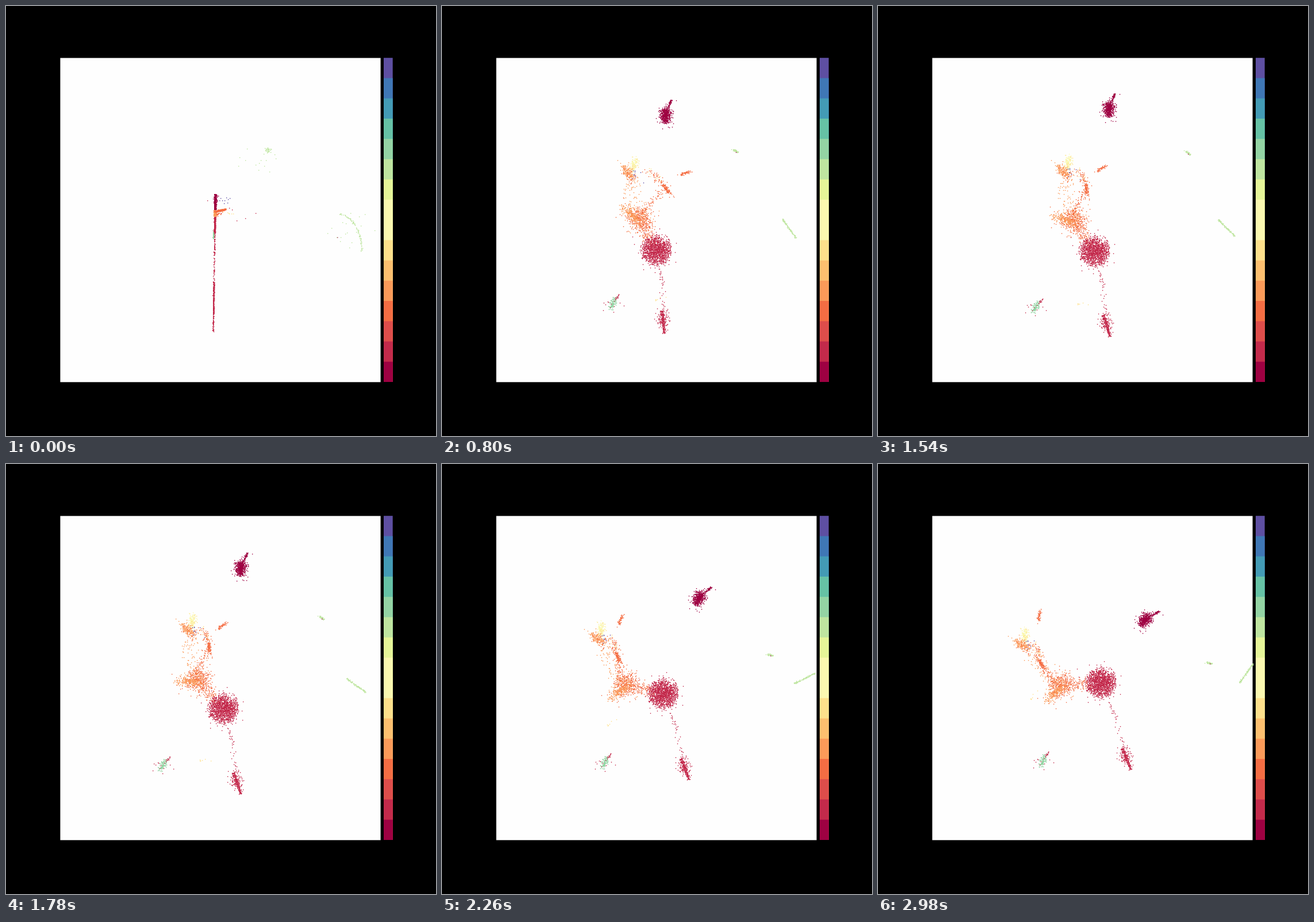
Write an HTML page with a canvas that moves like this. It is 748 px wide and 748 px high and loops after 3030 ms.

```html
<!DOCTYPE html>
<html lang="en">
<head>
<meta charset="utf-8">
<title>Point clusters</title>
<style>
  html, body { margin: 0; width: 100%; height: 100%; overflow: hidden; background: #000; }
  canvas { display: block; }
</style>
</head>
<body>
<canvas id="stage" width="748" height="748"></canvas>
<script>
const ctx = document.getElementById('stage').getContext('2d');
const LOOP = 3030, STEP = 20, LAST = 2980;
const OPEN = 360;        // ms until the clusters have burst apart
const TURN = 2111;       // middle of the late swing
const BAR = ['#5e4fa2', '#3f77b5', '#439bb5', '#66c2a5', '#94d4a4', '#bfe5a0', '#e6f598', '#fbf8b0',
  '#fbf8b0', '#fee08b', '#fdbf6f', '#fb9a59', '#f46d43', '#de4d4b', '#c32a4b', '#9e0142'];
const [PURPLE, , , , GREEN, LIME, , PALE, , YELLOW, , LIGHT, ORANGE, , RED, DARK] = BAR;

let seed = 20247;
function rnd() {
  seed = (seed + 0x6d2b79f5) | 0;
  let r = Math.imul(seed ^ (seed >>> 15), 1 | seed);
  r = (r + Math.imul(r ^ (r >>> 7), 61 | r)) ^ r;
  return ((r ^ (r >>> 14)) >>> 0) / 4294967296;
}
const mix = (a, b, s) => a + (b - a) * s;
const between = (a, b) => mix(a, b, rnd());
const normal = () => Math.sqrt(-2 * Math.log(1 - rnd())) * Math.cos(2 * Math.PI * rnd());
function turn([x, y], deg) {
  const a = deg * Math.PI / 180, c = Math.cos(a), s = Math.sin(a);
  return [x * c - y * s, x * s + y * c];
}

// Shapes return one random offset inside a cluster
const gauss = (sx, sy) => () => [normal() * sx, normal() * sy];
const streak = (y0, y1, w, bend = 0) => () => {
  const y = between(y0, y1);
  return [bend * y + normal() * w, y];
};
const disc = (r, soft) => () => turn([r * Math.pow(rnd(), 0.58) + normal() * soft, 0], rnd() * 360);
const shift = (shape, ox, oy, deg = 0) => () => {
  const [x, y] = turn(shape(), deg);
  return [x + ox, y + oy];
};

// Starts return one random point of the opening picture
const stem = (y0, y1, noise = 0.5) => () => {
  const y = between(y0, y1);
  return [364.2 - (y - 328) * 0.015 + normal() * noise, y];
};
const dab = (x, y, sx, sy) => shift(gauss(sx, sy), x, y);
const branch = () => {
  const s = rnd();
  return [363 + 19 * s + normal() * 0.6, 358 - 4 * s + normal() * 0.6];
};
const sickle = () => {
  const a = Math.pow(rnd(), 0.8) * Math.PI / 2;
  return [578 + 41 * Math.sin(a) + normal() * 0.7, 426 - 64 * Math.cos(a) + normal() * 0.7];
};

// Paths: x, y, angle when burst apart, when settled and after the swing
const path = (burst, calm, end, lead = 0) => ({ burst, calm, end, lead });
const top1 = path([372, 226, 4], [405, 177, 2], [466, 271, 42]);
const ball = path([367, 418, 0], [378, 427, 0], [388, 380, 0]);
const foot = path([367, 522, 12], [400, 552, -22], [431, 508, -22]);
const leaf = path([333, 498, 8], [264, 525, 30], [286, 517, 18]);
const hip = path([345, 363, 50], [342, 371, 0], [316, 385, -60], 250);
const crest = path([335, 288, 25], [332, 273, 4], [255, 299, -5]);
const knot = path([428, 318, -82], [354, 317, 5], [282, 347, -32]);
const twig = path([472, 317, 90], [378, 282, 58], [279, 264, 10]);
const chip = path([472, 247, 90], [548, 255, 138], [578, 347, 100], 200);
const arc = path([602, 391, -25], [606, 386, -45], [641, 364, -145]);
const crumb = path([410, 482, 45], [345, 520, 110], [268, 405, 45]);

// Sideways moves lead, vertical ones settle faster but swing later
function pose({ burst, calm, end, lead }, t) {
  const since = Math.max(0, t - OPEN);
  const swing = 1 / (1 + Math.exp((TURN - lead - t) / 158));
  return burst.map((b, i) => {
    const vertical = i === 1;
    const settle = 1 - Math.exp(-since / (vertical ? 320 : 600));
    return mix(b, calm[i], settle) + (end[i] - calm[i]) * Math.pow(swing, vertical ? 1.6 : 1);
  });
}

const groups = [];
function cloud(color, n, start, shape, path) {
  const dots = Array.from({ length: n }, () => ({ start: start(), local: shape() }));
  groups.push({ color, dots, path });
}
function bridge(color, n, start, from, to, s0, s1, noise, bow = 0) {
  const shape = gauss(noise, noise);
  const dots = Array.from({ length: n }, () => ({ start: start(), local: shape(), s: between(s0, s1) }));
  groups.push({ color, dots, from, to, bow });
}

const joint = stem(356, 366, 0.7);
cloud(PALE, 140, joint, gauss(2.8, 5.5), crest);
cloud(YELLOW, 14, joint, gauss(4, 6), crest);
cloud(ORANGE, 300, joint, gauss(11, 9), hip);
cloud(LIGHT, 130, joint, gauss(9, 12), hip);
cloud(ORANGE, 40, dab(368, 362, 3, 2), gauss(20, 18), hip);
bridge(ORANGE, 130, joint, hip, ball, 0.15, 0.75, 6);

cloud(RED, 1250, stem(345, 395), disc(23.5, 3.2), ball);
cloud(RED, 150, stem(345, 567), gauss(15, 16), ball);
bridge(RED, 36, stem(400, 567), ball, foot, 0.25, 0.9, 2, 5);
cloud(RED, 170, stem(480, 537), streak(-14, 25, 1.2), foot);
cloud(RED, 110, stem(480, 567), gauss(5.5, 7), foot);

cloud(GREEN, 110, dab(360.9, 399, 0.3, 3), gauss(2.4, 6), leaf);
cloud(RED, 14, stem(398, 440), streak(-19, -7, 0.8, -0.25), leaf);
cloud(RED, 12, stem(410, 460), gauss(10, 10), leaf);

cloud(DARK, 310, stem(328, 355, 0.8), gauss(4.8, 5.5), top1);
cloud(DARK, 190, stem(328, 355, 0.8), streak(-9, 15, 2.8), top1);
cloud(DARK, 60, stem(328, 355, 0.8), streak(-27, -8, 1, -0.3), top1);
cloud(DARK, 65, dab(365, 338, 1.2, 5), gauss(7, 11), top1);

cloud(LIGHT, 170, branch, shift(gauss(9, 3.6), -17, 0, 25), hip);
cloud(LIGHT, 170, joint, shift(gauss(8, 4.2), -7, 15, 40), crest);
cloud(ORANGE, 30, branch, shift(gauss(9, 5), -2, 20, 40), crest);
cloud(PURPLE, 9, dab(380, 340, 7, 4), shift(gauss(8, 4), 11, 20, 40), crest);
bridge(ORANGE, 50, branch, crest, knot, 0.35, 0.95, 3.5, 6);
bridge(YELLOW, 12, joint, crest, knot, 0.3, 0.8, 5, 6);
bridge(ORANGE, 60, branch, knot, hip, 0.1, 0.85, 3.5, -3);
bridge(LIGHT, 50, joint, crest, hip, 0.2, 0.8, 8, -8);
cloud(ORANGE, 110, branch, gauss(1.9, 7), knot);
cloud(ORANGE, 55, branch, gauss(1.2, 7.5), twig);

cloud(LIME, 32, dab(455, 251, 3, 2), streak(-5, 5, 0.8), chip);
cloud(LIME, 14, dab(455, 262, 18, 14), gauss(1, 4), chip);
cloud(DARK, 1, dab(577, 403, 0, 0), gauss(1, 1), chip);
cloud(LIME, 75, sickle, streak(-20, 20, 0.6), arc);
cloud(LIME, 20, dab(590, 390, 20, 18), streak(-20, 20, 0.6), arc);
cloud(YELLOW, 6, dab(390, 360, 9, 2), gauss(1, 4), crumb);
cloud(RED, 7, dab(400, 362, 22, 14), gauss(18, 18), ball);

function placer(g, t) {
  if (g.path) {
    const [x, y, deg] = pose(g.path, t);
    return ({ local }) => {
      const [dx, dy] = turn(local, deg);
      return [x + dx, y + dy];
    };
  }
  const [ax, ay] = pose(g.from, t), [bx, by] = pose(g.to, t);
  const dx = bx - ax, dy = by - ay, len = Math.hypot(dx, dy);
  const spread = 1 + 1.1 * Math.exp(-Math.max(0, t - OPEN) / 150);
  return ({ local, s }) => {
    const b = g.bow * 4 * s * (1 - s) / len;
    return [ax + dx * s + dy * b + local[0] * spread, ay + dy * s - dx * b + local[1] * spread];
  };
}

function drawFrame() {
  ctx.fillStyle = '#000';
  ctx.fillRect(0, 0, 748, 748);
  ctx.fillStyle = '#fefefe';
  ctx.fillRect(94.4, 90.4, 557.2, 563.9);
  BAR.forEach((color, i) => {
    const y = 90.2 + i * 563.8 / BAR.length;
    ctx.fillStyle = color;
    ctx.fillRect(657, y, 15.7, 654 - y);
  });
}

function draw(t) {
  drawFrame();
  const u = Math.min(t / OPEN, 1), e = 1.6 * u - 0.6 * u * u;
  for (const g of groups) {
    const place = placer(g, t);
    ctx.fillStyle = g.color;
    for (const dot of g.dots) {
      const [x, y] = place(dot), [x0, y0] = dot.start;
      ctx.fillRect(Math.round(mix(x0, x, e) - 0.7), Math.round(mix(y0, y, e) - 0.7), 1.4, 1.4);
    }
  }
}

const begin = performance.now();
function tick() {
  const t = (performance.now() - begin) % LOOP;
  draw(Math.min(Math.floor(t / STEP) * STEP, LAST));
  requestAnimationFrame(tick);
}
tick();
</script>
</body>
</html>
```
